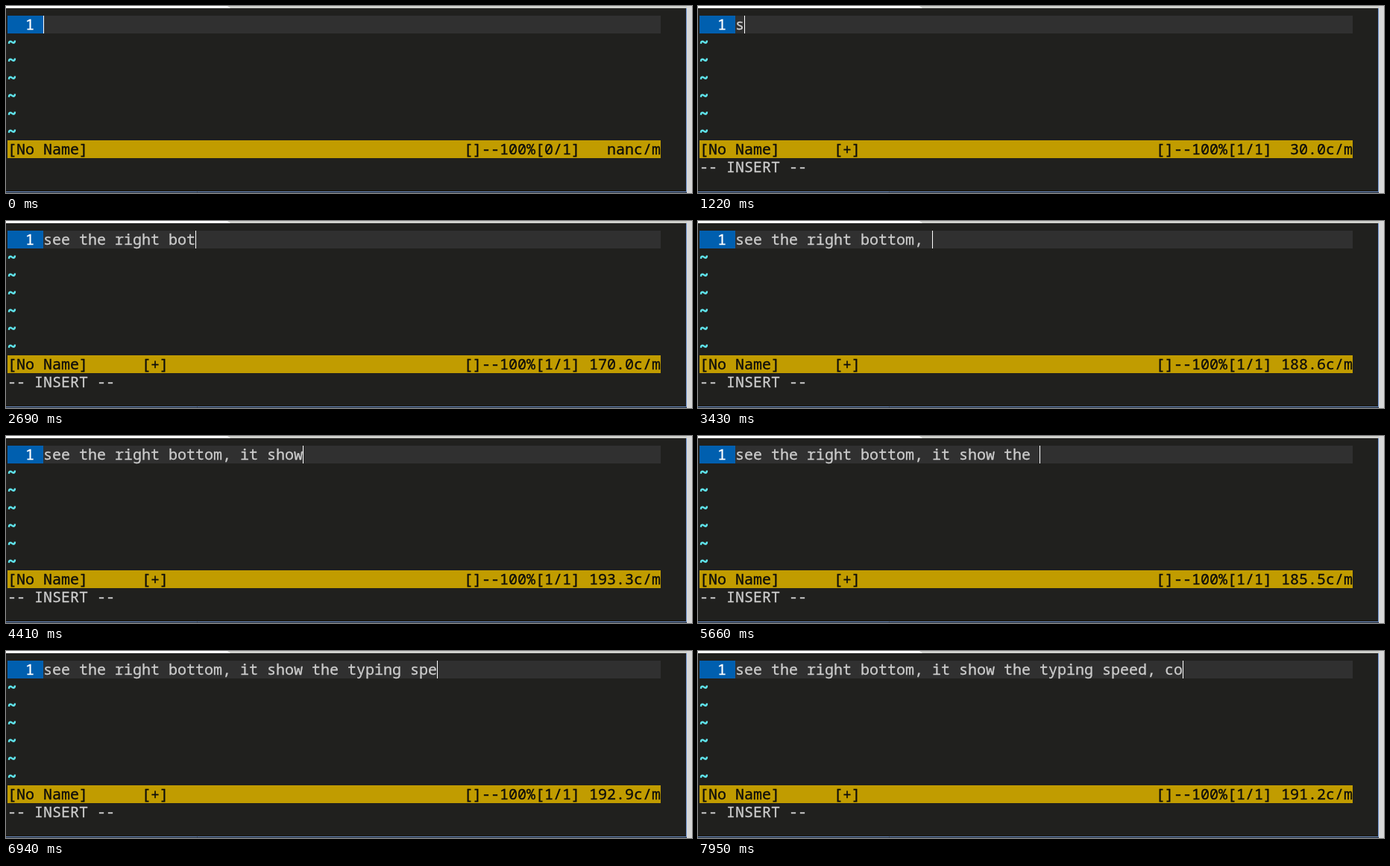
These frames come from a looping animation (920x252 px, 8000 ms). An HTML page:

```html
<!DOCTYPE html>
<html>
<head>
<meta charset="utf-8">
<style>
html, body { margin: 0; width: 100%; height: 100%; overflow: hidden; background: #20201e; }
svg { display: block; }
text {
  font: 500 20px "Noto Sans Mono", "DejaVu Sans Mono", monospace;
  fill: #ccc; stroke: #ccc; stroke-width: .3px; white-space: pre;
}
.number { fill: #fff; stroke: #fff; }
.bar text { fill: #0c0c0c; stroke: #0c0c0c; }
.tilde text { fill: #61e6ee; stroke: #61e6ee; stroke-width: 1px; font-weight: bold; }
</style>
</head>
<body>
<svg width="920" height="252" viewBox="0 0 920 252">
  <rect width="920" height="252" fill="#20201e"/>
  <path d="M0 0H920V3H0z" fill="#cfd0cc"/>
  <path d="M0 0H297L301 3H0z" fill="#fff"/>
  <path d="M913 0H920V252H913z" fill="#d8d8d8"/>
  <path d="M912.5 3V250.5H0" fill="none" stroke="#6f94d0"/>
  <rect x="2" y="13" width="876" height="24" fill="#303030"/>
  <rect x="2" y="13" width="48" height="24" fill="#005faf"/>
  <text class="number" x="26" y="32">1</text>
  <text id="line" x="50" y="32"></text>
  <rect id="cursor" y="13" width="1" height="24" fill="#fff"/>
  <g class="tilde" id="tildes"></g>
  <g class="bar">
    <rect x="2" y="181" width="876" height="24" fill="#c19c00"/>
    <text x="2" y="200">[No Name]</text>
    <text id="modified" x="182" y="200">[+]</text>
    <text id="ruler" x="614" y="200"></text>
    <text id="speed" x="782" y="200"></text>
  </g>
  <text id="mode" x="2" y="224">-- INSERT --</text>
</svg>
<script>
const LOOP = 8000, INSERT_AT = 270;
const $ = id => document.getElementById(id);

// [time, keys]: '<' erases, '{' erases and uncounts, '!' only refreshes the speed
const keys = [
  [1220, 's'], [1300, 'e'], [1380, 'e'], [1460, ' t'], [1540, 'h'], [1620, 'e'],
  [1690, ' '], [1770, 'r'], [1850, 'i'], [1930, 'g'], [2000, 'h'], [2070, 't'],
  [2230, ' '], [2390, 'b'], [2490, 'o'], [2690, 't'], [2740, 't'], [2780, 'o'],
  [3040, 'm'], [3270, ','], [3430, ' '], [3970, 'i'], [4060, 't'], [4150, ' '],
  [4240, 's'], [4330, 'ho'], [4410, 'w'], [4480, 's'], [4640, '!'], [4800, '{'],
  [4850, ' '], [4920, 't'], [4970, 'h'], [5040, 'e'], [5110, ' '], [5790, 't'],
  [5860, 'y'], [5950, 'p'], [6110, 'n'], [6240, '<'], [6400, 'i'], [6460, 'n'],
  [6520, 'g'], [6680, ' s'], [6750, 'p'], [6880, 'e'], [6950, 'e'], [7060, 'd'],
  [7170, ','], [7360, ' '], [7520, '!'], [7880, 'c'], [7950, 'o']
];
const cursorOff = [[50, 330], [590, 850], [3750, 3970], [5400, 5660], [7650, 7880]];

for (let y = 56; y < 180; y += 24)
  $('tildes').innerHTML += `<text x="2" y="${y}">~</text>`;

// Characters per minute over whole seconds, one decimal, ties to even
function rate(count, time) {
  const seconds = Math.max(1, Math.floor((time - 280) / 480) + 1);
  const tenths = count * 600 / seconds;
  return ((Math.round(tenths) - (tenths % 2 === 0.5)) / 10).toFixed(1);
}

function draw(t) {
  let text = '', count = 0, last = INSERT_AT;
  for (const [time, chars] of keys) {
    if (time > t) break;
    last = time;
    for (const c of chars) {
      if (c === '!') continue;
      if (c === '<' || c === '{') {
        text = text.slice(0, -1);
        if (c === '{') count--;
      } else {
        text += c;
        count++;
      }
    }
  }
  const show = (id, on) => $(id).setAttribute('visibility', on ? 'visible' : 'hidden');
  const inserting = t >= INSERT_AT;
  $('line').textContent = text;
  $('cursor').setAttribute('x', 50 + 12 * text.length);
  $('ruler').textContent = `[]--100%[${text ? 1 : 0}/1]`;
  $('speed').textContent = `${inserting ? rate(count, last) : 'nan'}c/m`.padStart(8);
  show('cursor', !cursorOff.some(([a, b]) => t >= a && t < b));
  show('modified', text);
  show('mode', inserting);
}

const start = performance.now();
function tick() {
  draw((performance.now() - start) % LOOP);
  requestAnimationFrame(tick);
}
tick();
</script>
</body>
</html>
```
